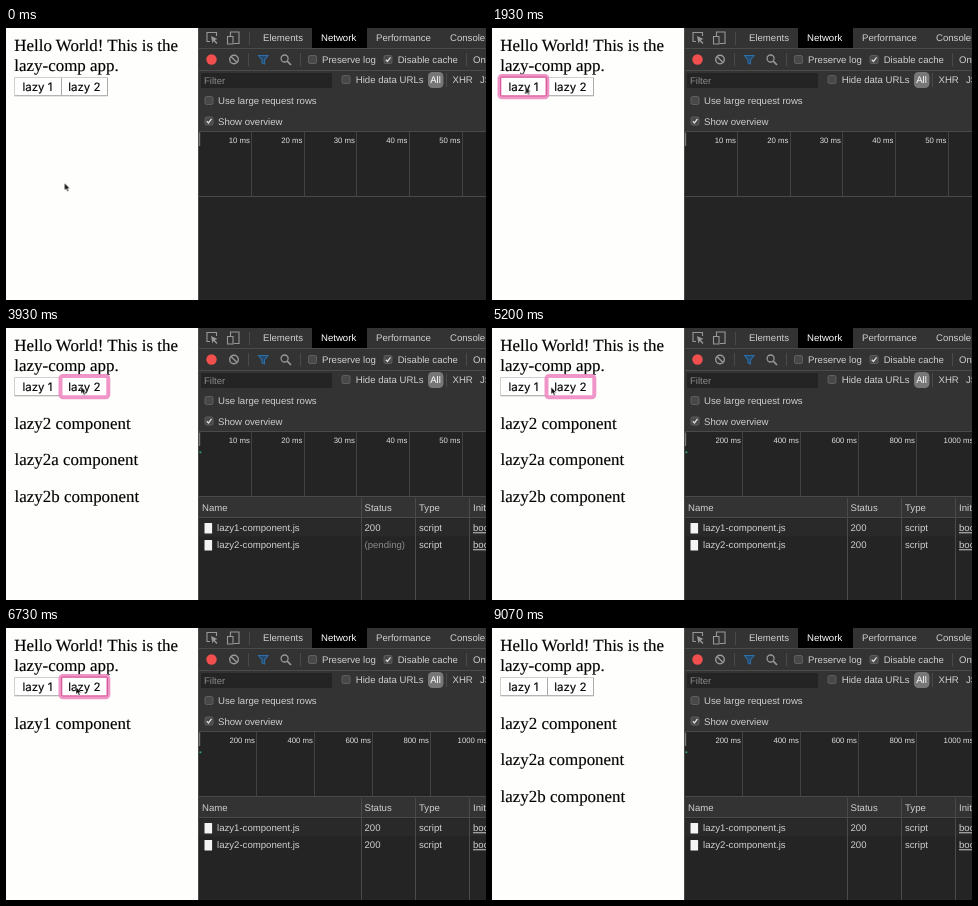
Animation of 480 by 272 pixels, one loop 9130 ms. Source, as an HTML page:

```html
<!DOCTYPE html>
<html lang="en">
<head>
<meta charset="utf-8">
<title>Lazy components</title>
<style>
html, body { margin: 0; width: 100%; height: 100%; overflow: hidden; background: #fefefd; }
svg { display: block; width: 480px; height: 272px; }
text { font: 9.6px "Liberation Sans", Arial, sans-serif; fill: #cfcfcf; white-space: pre; text-rendering: geometricPrecision; }
.page text { font: 16.95px "Liberation Serif", Times, serif; fill: #000; stroke: #000; stroke-width: .15; }
.page .label { font: 11.5px Inter, sans-serif; text-anchor: middle; }
.ruler text { font-size: 7.8px; text-anchor: end; fill: #ddd; }
.on { fill: #fff; }
.dim { fill: #8a8a8a; }
.icon { fill: none; stroke: #989898; stroke-width: 1.1; }
.lines { stroke: #4a4a4a; fill: none; }
.ruler .lines { stroke: #424242; }
.box { fill: #484848; stroke: #686868; stroke-width: .8; }
.tick { fill: none; stroke: #ddd; stroke-width: 1.3; }

/* All parts share one 9.13 s clock; percent = ms / 91.3 */
.ring, .press, .one, .two, .bar, .table, .row2, .fine, .coarse, .wait, .done { animation: 9.13s step-end infinite; }
.ring { animation-name: ring; }
.press { animation-name: press; }
.one { animation-name: one; }
.two { animation-name: two; }
.bar { animation-name: bar; }
.table { animation-name: table; }
.row2 { animation-name: row2; }
.fine, .wait { animation-name: before; }
.coarse, .done { animation-name: after; }
.cursor { animation: move 9.13s ease-in-out infinite; }

@keyframes ring {
  0% { opacity: 0; transform: none; }
  20.4% { opacity: 1; transform: none; }
  42.2% { opacity: 1; transform: translateX(47px); }
  61.3% { opacity: 1; transform: none; }
  73.68% { opacity: 1; transform: translateX(47px); }
  94.9%, 100% { opacity: 0; transform: none; }
}
@keyframes press {
  0%, 21.9%, 43%, 62.1%, 74.47%, 100% { opacity: 0; }
  20.4%, 42.2%, 61.3%, 73.68% { opacity: 1; }
}
@keyframes one {
  0% { opacity: 0; } 21.9% { opacity: 1; } 43% { opacity: 0; }
  62.1% { opacity: 1; } 74.47%, 100% { opacity: 0; }
}
@keyframes two {
  0% { opacity: 0; } 43% { opacity: 1; }
  62.1% { opacity: 0; } 74.47%, 100% { opacity: 1; }
}
@keyframes bar { 0% { opacity: 0; } 24.85% { opacity: 1; } 43%, 100% { opacity: 0; } }
@keyframes table { 0% { opacity: 0; } 21.9%, 100% { opacity: 1; } }
@keyframes row2 { 0% { opacity: 0; } 43%, 100% { opacity: 1; } }
@keyframes before { 0% { opacity: 1; } 43.8%, 100% { opacity: 0; } }
@keyframes after { 0% { opacity: 0; } 43.8%, 100% { opacity: 1; } }
@keyframes move {
  0%, 7.67% { transform: translate(58.5px, 155px); }
  14.2%, 29.6% { transform: translate(33.5px, 58.5px); }
  36.1% { transform: translate(75px, 58.5px); }
  55.3% { transform: translate(75px, 58.5px); animation-timing-function: ease-in; }
  56.95% { transform: translate(59.3px, 59px); animation-timing-function: ease-out; }
  59.8%, 64.8% { transform: translate(36px, 58.5px); }
  71.2%, 84.5% { transform: translate(70px, 59px); }
  91%, 100% { transform: translate(202px, 238px); }
}
</style>
</head>
<body>
<svg viewBox="0 0 480 272">
  <defs>
    <g id="check"><rect class="box" x=".5" y=".5" width="8" height="8" rx="1.5"/></g>
    <g id="checked"><use href="#check"/><path class="tick" d="M2.3 4.7 4 6.5 7 2.4"/></g>
    <rect id="file" width="7.6" height="10.6" rx=".6" fill="#f4f4f4"/>
  </defs>

  <g class="page">
    <rect width="193" height="272" fill="#fefefd"/>
    <text x="8.3" y="23.3">Hello World! This is the</text>
    <text x="8.3" y="43">lazy-comp app.</text>
    <g fill="#fff" stroke="#d0d0d0">
      <path d="M8.5 49.5H55.5V67.5H8.5ZM55.5 49.5H101.5V67.5H55.5Z"/>
      <path d="M8.5 67.8H101.5V49.5M55.5 49.5V67.5" fill="none" stroke="#aaa"/>
    </g>
    <g class="ring" fill="none">
      <rect x="7.5" y="48" width="47.8" height="21.2" rx="2.5" fill="#fff" stroke="#ef8ac3" stroke-opacity=".9" stroke-width="4"/>
      <rect class="press" x="8.5" y="49" width="46" height="19" rx="1" stroke="#c9467f" stroke-opacity=".7"/>
    </g>
    <text class="label" x="31.4" y="62.8">lazy 1</text>
    <text class="label" x="78.4" y="62.8">lazy 2</text>
    <g class="one"><text x="8.6" y="101">lazy1 component</text></g>
    <g class="two">
      <text x="8.6" y="101">lazy2 component</text>
      <text x="8.6" y="137.4">lazy2a component</text>
      <text x="8.6" y="174">lazy2b component</text>
    </g>
    <path class="cursor" d="M0 0V7.2L1.7 5.8 2.9 8.6 4.2 8 3 5.4H5.2Z" fill="#111" stroke="#fff" stroke-width=".4"/>
  </g>

  <g class="panel">
    <rect x="192" width="288" height="272" fill="#242424"/>
    <rect x="192" width="288" height="104" fill="#333"/>
    <rect x="306" width="55" height="20" fill="#000"/>
    <rect x="195" y="45" width="131" height="15" fill="#242424"/>
    <path class="lines" d="M192 20.5H480M192 42.5H480M192 103.5H480M192 168.5H480M243.5 4V17M242.5 25V38M294.5 25V38M460.5 25V38M440.5 45V59"/>
    <path d="M192.5 0V272" stroke="#484848"/>

    <g class="icon">
      <path d="M204 13.5H201V4.5H210.5V8"/>
      <path d="M205 8 211.5 11 208.8 12 211.5 15 210.5 16 207.7 13 206.4 15.5Z" fill="#989898" stroke="none"/>
      <path d="M224.5 8V4H233V15.5H228M221.5 8.5H227V16H221.5Z"/>
      <circle cx="228" cy="31.5" r="4.3" stroke-width="1.4"/><path d="M225 28.5 231 34.5" stroke-width="1.4"/>
      <circle cx="278.6" cy="30.5" r="3.5" stroke-width="1.3"/><path d="M281.2 33.2 285 37" stroke-width="1.7"/>
      <path d="M252.5 27.5H262L258.5 32V36L256 34.8V32Z" fill="#24496a" stroke="#2e6ea6"/>
    </g>
    <circle cx="205.5" cy="31.5" r="5.2" fill="#f04f4d"/>

    <text x="257" y="13.4">Elements</text>
    <text class="on" x="315" y="13.4">Network</text>
    <text x="370" y="13.4">Performance</text>
    <text x="444" y="13.4">Console</text>

    <use href="#check" x="302" y="27"/><text x="316" y="34.6">Preserve log</text>
    <use href="#checked" x="377.5" y="27"/><text x="391.7" y="34.6">Disable cache</text>
    <text x="467" y="34.6">Online</text>

    <text class="dim" x="198" y="56.2">Filter</text>
    <use href="#check" x="335.5" y="47"/><text x="349.8" y="55">Hide data URLs</text>
    <rect x="422" y="44" width="15.5" height="16" rx="4.5" fill="#777"/>
    <text class="on" x="424.2" y="55.2">All</text>
    <text x="446.5" y="55.2">XHR</text><text x="474" y="55.2">JS</text>

    <use href="#check" x="198.5" y="68"/><text x="212" y="76">Use large request rows</text>
    <use href="#checked" x="198.5" y="88.5"/><text x="212" y="96.8">Show overview</text>

    <g class="ruler">
      <g class="fine">
        <path class="lines" d="M245.5 104V168M298.5 104V168M350.5 104V168M403.5 104V168M456.5 104V168"/>
        <text x="244" y="115">10 ms</text><text x="296.5" y="115">20 ms</text>
        <text x="349" y="115">30 ms</text><text x="401.5" y="115">40 ms</text>
        <text x="454.5" y="115">50 ms</text>
      </g>
      <g class="coarse">
        <path class="lines" d="M250.5 104V168M308.5 104V168M366.5 104V168M424.5 104V168"/>
        <text x="249" y="115">200 ms</text><text x="307" y="115">400 ms</text>
        <text x="365" y="115">600 ms</text><text x="423" y="115">800 ms</text>
        <text x="481.5" y="115">1000 ms</text>
      </g>
      <path d="M193.5 104.5V118" stroke="#777" stroke-width="1.4"/>
      <g class="bar">
        <path d="M194 124.3H203" stroke="#7d8a85" stroke-width="1.6"/>
        <path d="M203 124.3H224.5" stroke="#31a673" stroke-width="1.8"/>
      </g>
      <path class="row2" d="M193.5 124.3H195.3" stroke="#31a673" stroke-width="1.8"/>
    </g>

    <g class="table">
      <rect x="193" y="169" width="287" height="20.5" fill="#333"/>
      <rect x="193" y="191" width="287" height="17.5" fill="#292929"/>
      <path class="lines" d="M193 189.5H480M355.5 170V272M409.5 170V272M463.5 170V272"/>
      <text x="196" y="183.3">Name</text><text x="358.5" y="183.3">Status</text>
      <text x="413" y="183.3">Type</text><text x="467" y="183.3">Initiator</text>
      <use href="#file" x="198.5" y="195"/>
      <text x="211" y="203.3">lazy1-component.js</text><text x="358.5" y="203.3">200</text>
      <text x="413" y="203.3">script</text><text x="467" y="203.3" text-decoration="underline">bootstrap</text>
      <g class="row2">
        <use href="#file" x="198.5" y="212"/>
        <text x="211" y="220.3">lazy2-component.js</text>
        <text class="dim wait" x="358.5" y="220.3">(pending)</text>
        <text class="done" x="358.5" y="220.3">200</text>
        <text x="413" y="220.3">script</text><text x="467" y="220.3" text-decoration="underline">bootstrap</text>
      </g>
    </g>
  </g>
</svg>
</body>
</html>
```
